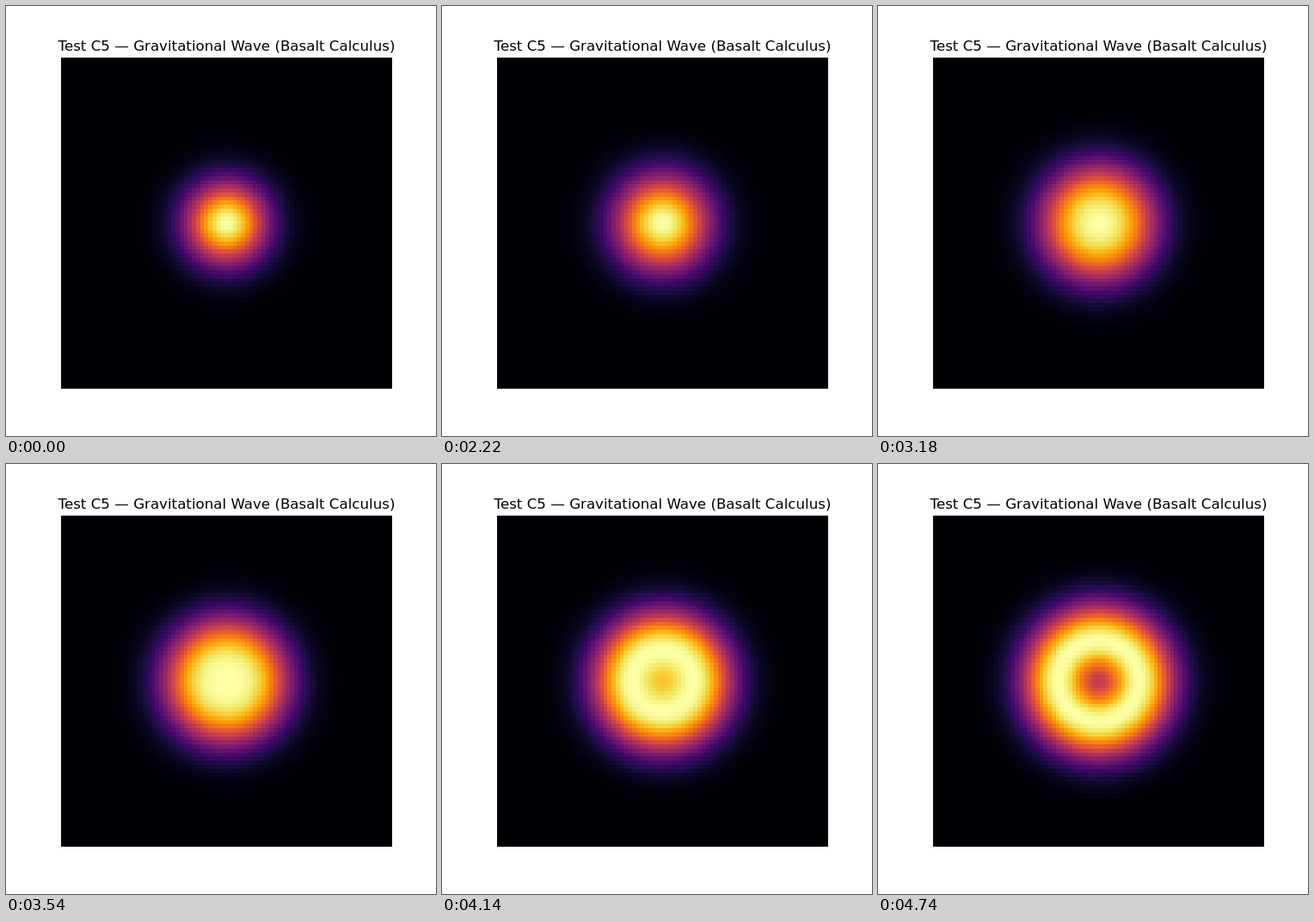
An HTML page with a canvas that plays this animation: 500 px wide and 500 px high, repeating every 4.8 s.

```html
<!DOCTYPE html>
<html lang="en">
<head>
<meta charset="utf-8">
<title>Wave</title>
<style>
  html, body { margin: 0; width: 100%; height: 100%; overflow: hidden; background: #fff; }
  canvas { position: absolute; left: 64px; top: 60px; }
  svg { position: absolute; left: 0; top: 0; }
  text { font: 16.667px "DejaVu Sans", sans-serif; text-anchor: middle; }
</style>
</head>
<body>
<canvas id="field" width="385" height="385"></canvas>
<svg width="500" height="500"><text x="256.5" y="52">Test C5 — Gravitational Wave (Basalt Calculus)</text></svg>
<script>
const GRID = 81, SIZE = 385, STEPS = 80, STEP_MS = 60;
const DX = 0.1, DT = 0.01, COUPLING = (DT / DX) ** 2;

const stops = ("000004 08051d 180c3c 2f0a5b 450a69 5c126e 71196e 87216b 9b2964 b1325a " +
  "c43c4e d74b3f e55c30 f1711f f8870e fca108 fbba1f f6d543 f1ed71 fcffa4")
  .split(" ").map(hex => [0, 2, 4].map(i => parseInt(hex.slice(i, i + 2), 16)));

const palette = Array.from({ length: 256 }, (_, level) => {
  const pos = level / 255 * (stops.length - 1);
  const i = Math.min(stops.length - 2, Math.floor(pos));
  const rgb = stops[i].map((c, k) => Math.round(c + (stops[i + 1][k] - c) * (pos - i)));
  return `rgb(${rgb})`;
});

// A Gaussian bump at rest, released into the 2D wave equation.
function simulate() {
  const mid = (GRID - 1) / 2;
  let u = Float64Array.from({ length: GRID * GRID }, (_, i) => {
    const x = (i % GRID - mid) * DX, y = (Math.floor(i / GRID) - mid) * DX;
    return Math.exp(-x * x - y * y);
  });
  let prev = u;
  const frames = [];
  for (let n = 0; n < STEPS; n++) {
    frames.push(toLevels(u));
    const next = new Float64Array(u.length);
    for (let y = 1; y < GRID - 1; y++) {
      for (let x = 1; x < GRID - 1; x++) {
        const i = y * GRID + x;
        const lap = u[i - 1] + u[i + 1] + u[i - GRID] + u[i + GRID] - 4 * u[i];
        next[i] = 2 * u[i] - prev[i] + COUPLING * lap;
      }
    }
    prev = u;
    u = next;
  }
  return frames;
}

// Each frame is scaled to its own range.
function toLevels(u) {
  const min = Math.min(...u), max = Math.max(...u);
  return Uint8Array.from(u, v => Math.min(255, Math.floor((v - min) / (max - min) * 256)));
}

const ctx = document.getElementById("field").getContext("2d");
const edge = k => Math.round(k * SIZE / GRID);
const frames = simulate();
let shown = -1;

function draw(n) {
  frames[n].forEach((level, i) => {
    const col = i % GRID, row = Math.floor(i / GRID);
    const x = edge(col), y = edge(row);
    ctx.fillStyle = palette[level];
    ctx.fillRect(x, y, edge(col + 1) - x, edge(row + 1) - y);
  });
  shown = n;
}

const start = performance.now();
function tick() {
  const n = Math.floor((performance.now() - start) / STEP_MS) % STEPS;
  if (n !== shown) draw(n);
  requestAnimationFrame(tick);
}
draw(0);
requestAnimationFrame(tick);
</script>
</body>
</html>
```
